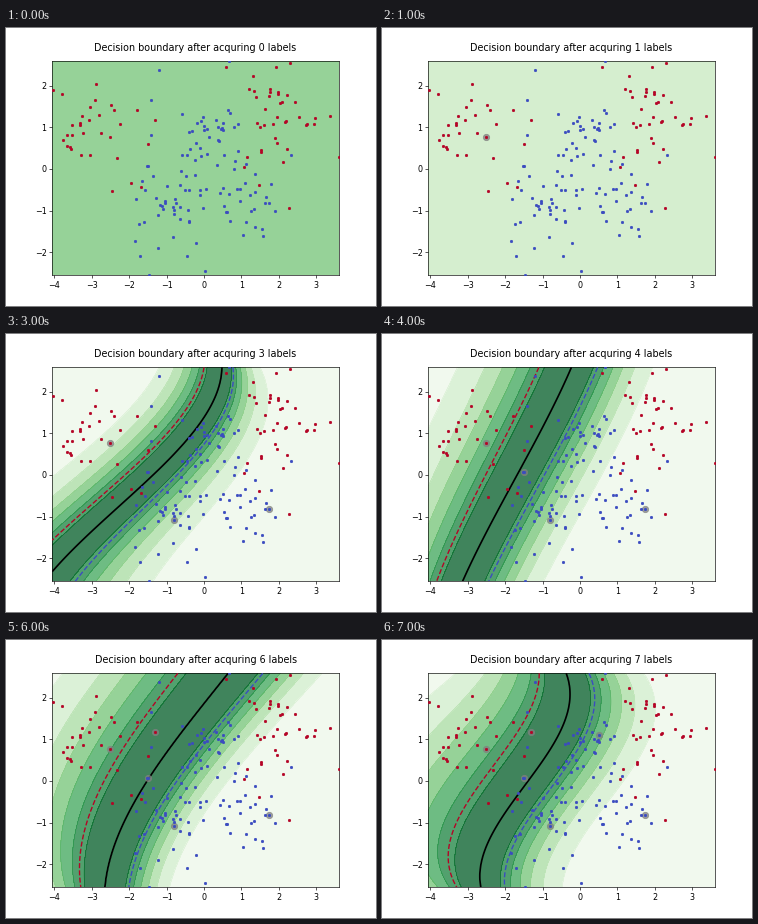
Write a matplotlib script that moves like this. It is 370 px wide and 278 px high and loops after 8000 ms.

```python
import numpy as np
import matplotlib.pyplot as plt
from matplotlib.animation import FuncAnimation

plt.rcParams["font.family"] = "DejaVu Sans"

W, H, DPI = 370, 278, 57.8125
XMIN, XMAX, YMIN, YMAX = -4.054, 3.607, -2.558, 2.587

RED, BLUE = "#b40426", "#3b4cc0"
GREENS = plt.get_cmap("Greens")


def entropy(p):
    return -p * np.log(p) - (1 - p) * np.log(1 - p)


# Log-odds at which the class entropy falls to .6, .5, ... .1
odds = np.linspace(0, 6, 2000)
EDGES = np.interp(-np.arange(0.6, 0.05, -0.1), -entropy(1 / (1 + np.exp(-odds))), odds)
QUARTER = np.log(3)  # log-odds of p = .75
BANDS = [GREENS((i + 0.5) / 7) for i in range(6, -1, -1)]

# Acquired points: (labels needed, x, y, class colour)
ACQUIRED = [
    (1, -2.52, 0.78, RED), (2, 1.75, -0.82, BLUE), (3, -0.80, -1.07, BLUE),
    (4, -1.50, 0.08, BLUE), (6, -1.32, 1.17, RED), (7, 0.52, 1.10, BLUE),
]
STRAYS = [
    (3.37, 1.28, RED), (3.61, 0.28, RED), (2.28, -0.93, RED), (-1.68, -0.44, RED),
    (0.58, 2.45, RED), (-1.20, 2.37, BLUE), (0.67, 2.59, BLUE),
    (-1.46, -2.55, BLUE), (0.04, -2.45, BLUE), (-1.70, -2.08, BLUE),
]
# Clusters: centre, spread, count, class colour
CLUSTERS = [
    ((-3.05, 0.95), (0.75, 0.70), 34, RED),
    ((1.90, 1.15), (0.50, 0.58), 37, RED),
    ((0.00, 1.00), (0.48, 0.42), 24, BLUE),
    ((-1.10, -0.90), (0.55, 0.55), 34, BLUE),
    ((-0.35, 0.00), (0.25, 0.55), 12, BLUE),
    ((1.00, -0.60), (0.50, 0.65), 32, BLUE),
]

# Each fit, top to bottom: boundary x, reach of the dashed lines to the left
# and to the right; then how many reaches the bands extend on each side.
FITS = {
    2: ([0.56, -0.08, -0.72, -1.34], [0.29], [0.29], (3.5, 3.5)),
    3: ([0.48, -0.43, -2.38, -4.27], [0.48, 0.75, 0.80], [0.29, 0.64, 0.83], (3.5, 3.5)),
    4: ([-0.23, -1.16, -2.19, -3.14], [0.87, 0.84, 0.69], [0.70, 0.73, 0.70], (3.5, 3.1)),
    5: ([-0.53, -1.47, -2.11, -2.65], [1.04, 0.88, 0.64], [0.88, 0.77, 0.64], (3.5, 2.9)),
    6: ([0.64, -0.85, -2.06, -2.65], [1.34, 1.15, 0.64], [0.93, 0.80, 0.64], (3.3, 2.7)),
    7: ([-0.37, -0.72, -2.06, -2.65], [0.72, 1.23, 0.64], [0.61, 0.75, 0.64], (4.1, 3.4)),
}

gx, gy = np.meshgrid(np.linspace(XMIN, XMAX, 290), np.linspace(YMIN, YMAX, 216))
depth = (YMAX - gy) / (YMAX - YMIN)


def through(values):
    """Polynomial in depth through evenly spaced values."""
    n = len(values)
    return np.polyval(np.polyfit(np.linspace(0, 1, n), values, n - 1), depth)


def log_odds(labels):
    """Signed log-odds on the grid, negative on the red side."""
    path, left, right, (far_l, far_r) = FITS[labels]
    off = gx - through(path)
    reach = np.where(off < 0, through(left), through(right))
    far = np.where(off < 0, far_l, far_r)
    power = np.log(EDGES[-1] / QUARTER) / np.log(far)
    return np.sign(off) * QUARTER * (np.abs(off) / reach) ** power


fig = plt.figure(figsize=(W / DPI, H / DPI + 1e-6), dpi=DPI, facecolor="white")
ax = fig.add_axes([0.125, 0.11, 0.775, 0.77])
ax.set(xlim=(XMIN, XMAX), ylim=(YMIN, YMAX), xticks=range(-4, 4), yticks=range(-2, 3))
title = ax.text(0.5, 1.05, "", size=12, ha="center", transform=ax.transAxes)


def dots(x, y, color):
    ax.scatter(x, y, s=8, color=color, zorder=4)


rng = np.random.default_rng(4)
for centre, spread, count, color in CLUSTERS:
    dots(*rng.normal(centre, spread, (count, 2)).T, color)
for x, y, color in STRAYS + [point[1:] for point in ACQUIRED]:
    dots(x, y, color)

drawn = []


def draw(labels):
    while drawn:
        drawn.pop().remove()
    title.set_text(f"Decision boundary after acquring {labels} labels")

    if labels < 2:
        shade = GREENS(0.5 if labels == 0 else 0.25)
        drawn.append(ax.axhspan(YMIN, YMAX, color=shade, alpha=0.75, lw=0, zorder=1))
    else:
        z = log_odds(labels)
        drawn.append(ax.contourf(gx, gy, np.abs(z), levels=[0, *EDGES, 1e9],
                                 colors=BANDS, alpha=0.75, zorder=1))
        drawn.append(ax.contour(gx, gy, np.abs(z), levels=EDGES, colors=BANDS[:-1],
                                linewidths=0.6, alpha=0.7, zorder=2))
        for level, color, style, width in [(-QUARTER, RED, "--", 1.7),
                                           (0, "black", "-", 2.1),
                                           (QUARTER, BLUE, "--", 1.7)]:
            drawn.append(ax.contour(gx, gy, z, levels=[level], colors=[color],
                                    linestyles=style, linewidths=width, zorder=3))

    rings = [(x, y) for need, x, y, _ in ACQUIRED if need <= labels]
    if rings:
        drawn.append(ax.scatter(*np.transpose(rings), s=62, color="gray",
                                alpha=0.75, zorder=3.5))
    return [title, *drawn]


anim = FuncAnimation(fig, draw, frames=8, interval=1000, init_func=lambda: [],
                     repeat=True, repeat_delay=0, blit=False)
plt.show()
```
